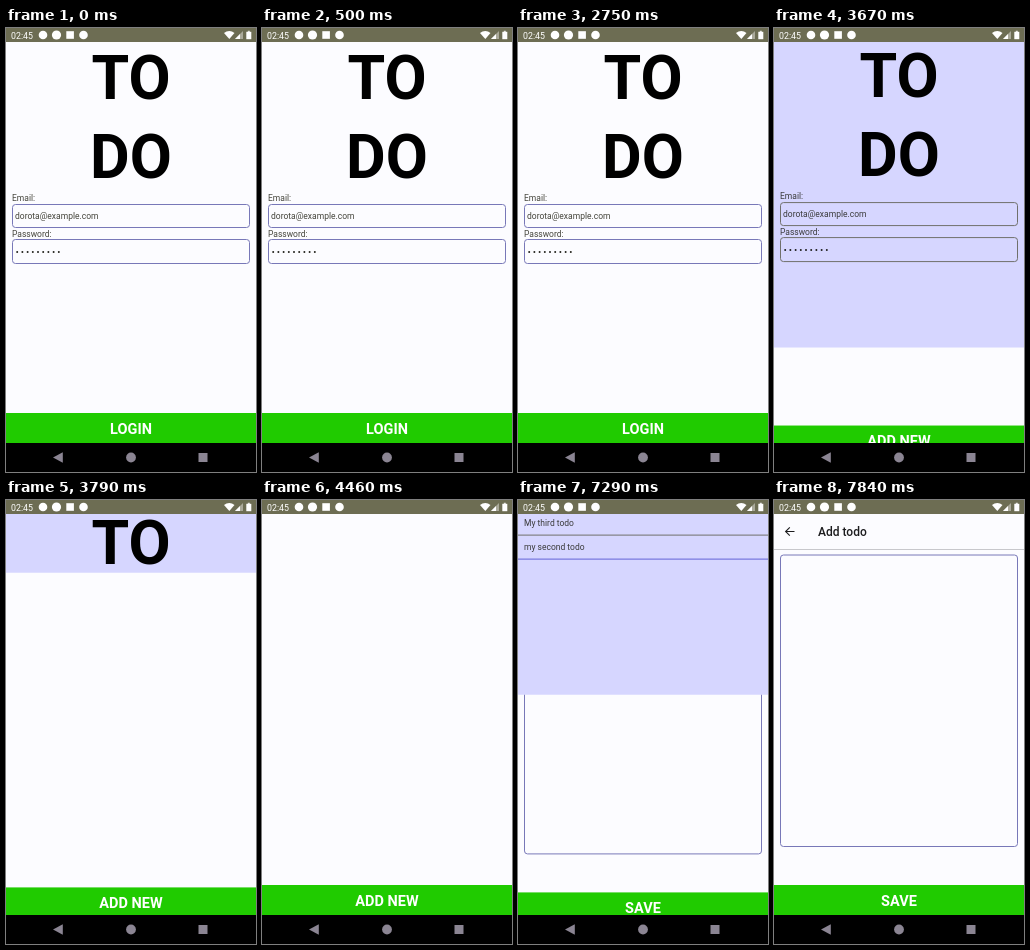
An HTML page with a canvas for the animation above (8000 ms loop, 250 by 444 pixels).

```html
<!DOCTYPE html>
<html lang="en">
<head>
<meta charset="utf-8">
<title>To do app</title>
<style>
  html, body { margin: 0; width: 100%; height: 100%; overflow: hidden; background: #000; }
  canvas { display: block; width: 250px; height: 444px; }
</style>
</head>
<body>
<canvas id="stage"></canvas>
<script>
const W = 250, H = 444, TOP = 14, BOTTOM = 415, VIEW = BOTTOM - TOP;
const LOOP = 8000, SLIDE = 425;
const OPEN_LIST = 3645, ITEMS_LOADED = 5170, OPEN_ADD = 7225;
const PAPER = '#fcfcff', LINE = '#7878b8', INK = '#45453c', GREEN = '#20cb00';

const canvas = document.getElementById('stage');
const ctx = canvas.getContext('2d');
const ratio = window.devicePixelRatio || 1;
canvas.width = W * ratio;
canvas.height = H * ratio;
ctx.scale(ratio, ratio);

function rect(x, y, w, h, color) {
  ctx.fillStyle = color;
  ctx.fillRect(x, y, w, h);
}

function dot(x, y, r, color) {
  ctx.fillStyle = color;
  ctx.beginPath();
  ctx.arc(x, y, r, 0, 7);
  ctx.fill();
}

function shape(color, ...points) {
  ctx.fillStyle = color;
  ctx.beginPath();
  points.forEach(([x, y]) => ctx.lineTo(x, y));
  ctx.fill();
}

function text(str, x, y, size = 8.5, color = INK, weight = 400, align = 'left') {
  ctx.font = `${weight} ${size}px Roboto, sans-serif`;
  ctx.textAlign = align;
  ctx.fillStyle = color;
  ctx.fillText(str, x, y);
}

function field(y, h, color = LINE) {
  ctx.strokeStyle = color;
  ctx.lineWidth = 1;
  ctx.beginPath();
  ctx.roundRect(6.5, y, 237, h, 3);
  ctx.stroke();
}

function button(label) {
  rect(0, 385, W, 30, GREEN);
  text(label, 125, 405.5, 14.5, '#fff', 700, 'center');
}

function loginScreen(dimmed) {
  const line = dimmed ? '#84846c' : LINE;
  text('TO', 125, 70.5, 61, '#000', 700, 'center');
  text('DO', 125, 150, 61, '#000', 700, 'center');
  text('Email:', 6, 173);
  field(176.5, 23, line);
  text('dorota@example.com', 9, 191);
  text('Password:', 6, 209);
  field(211.5, 24, line);
  for (let i = 0; i < 9; i++) dot(11.2 + i * 5.2, 224, 1, '#22221c');
  button('LOGIN');
}

function listScreen(loaded) {
  if (loaded) {
    text('My third todo', 6, 30);
    rect(0, 39, W, 1, '#84846c');
    text('my second todo', 6, 54.5);
    rect(0, 63, W, 1, '#7474d8');
  }
  button('ADD NEW');
}

function addScreen() {
  ctx.strokeStyle = '#1c1c1e';
  ctx.lineWidth = 1.1;
  ctx.stroke(new Path2D('M20.5 31.5H11.8M15.8 27.3L11.6 31.5L15.8 35.7'));
  text('Add todo', 44, 36, 12, '#1c1c1e', 500);
  rect(0, 49, W, 1, '#c8c8cc');
  field(55, 291.5);
  button('SAVE');
}

function systemBars() {
  rect(0, 0, W, TOP, '#6d6d53');
  text('02:45', 5, 10.6, 8.8, '#fff');
  dot(37, 7, 4.3, '#fff');
  dot(50.5, 7, 4.6, '#fff');
  rect(60.3, 3.2, 7.6, 7.6, '#fff');
  dot(77.5, 7, 4.3, '#fff');
  shape('#fff', [218, 5], [220.5, 3.5], [223.3, 3], [226, 3.5], [228.5, 5], [223.3, 11]);
  shape('#aaa99a', [229, 11], [237, 3], [237, 11]);
  shape('#fff', [229, 11], [234, 6], [234, 11]);
  rect(240.3, 3.8, 5, 7.4, '#fff');
  rect(241.8, 2.8, 2, 1, '#fff');

  rect(0, BOTTOM, W, H - BOTTOM, '#000');
  const key = '#8b8593';
  shape(key, [47, 429.5], [56.8, 424.3], [56.8, 434.7]);
  dot(125, 429.5, 4.9, key);
  rect(192.5, 425, 9, 9, key);
}

// cubic-bezier(0.20833, 0.82, 0.25, 1)
function ease(x) {
  if (x <= 0 || x >= 1) return x <= 0 ? 0 : 1;
  const curve = (s, a, b) => 3 * s * (1 - s) ** 2 * a + 3 * s * s * (1 - s) * b + s ** 3;
  let lo = 0, hi = 1;
  for (let i = 0; i < 24; i++) {
    const mid = (lo + hi) / 2;
    if (curve(mid, 0.20833, 0.25) < x) lo = mid; else hi = mid;
  }
  return curve(lo, 0.82, 1);
}

function layer(clipTop, shift, draw) {
  ctx.save();
  ctx.beginPath();
  ctx.rect(0, clipTop, W, BOTTOM - clipTop);
  ctx.clip();
  rect(0, TOP, W, VIEW, PAPER);
  ctx.translate(0, shift);
  draw();
  ctx.restore();
}

// The next screen is uncovered from the bottom while the current one drifts up and dims.
function reveal(p, current, next) {
  if (p < 1) {
    layer(TOP, -0.02 * VIEW * p, () => current(p > 0.1));
    if (p > 0) {
      ctx.save();
      ctx.globalCompositeOperation = 'multiply';
      ctx.globalAlpha = Math.min(1, p / 0.2);
      rect(0, TOP, W, VIEW, '#d9d9ff');
      ctx.restore();
    }
  }
  if (p > 0) layer(TOP + VIEW * (1 - p), 0.041 * VIEW * (1 - p), next);
}

function frame(now) {
  const t = now % LOOP;
  const progress = start => ease((t - start) / SLIDE);
  const list = () => listScreen(t >= ITEMS_LOADED);
  if (t < OPEN_ADD) reveal(progress(OPEN_LIST), loginScreen, list);
  else reveal(progress(OPEN_ADD), list, addScreen);
  systemBars();
  requestAnimationFrame(frame);
}

const begin = performance.now();
const tick = frame;
frame = now => tick(Math.max(0, now - begin));
frame(begin);
</script>
</body>
</html>
```
